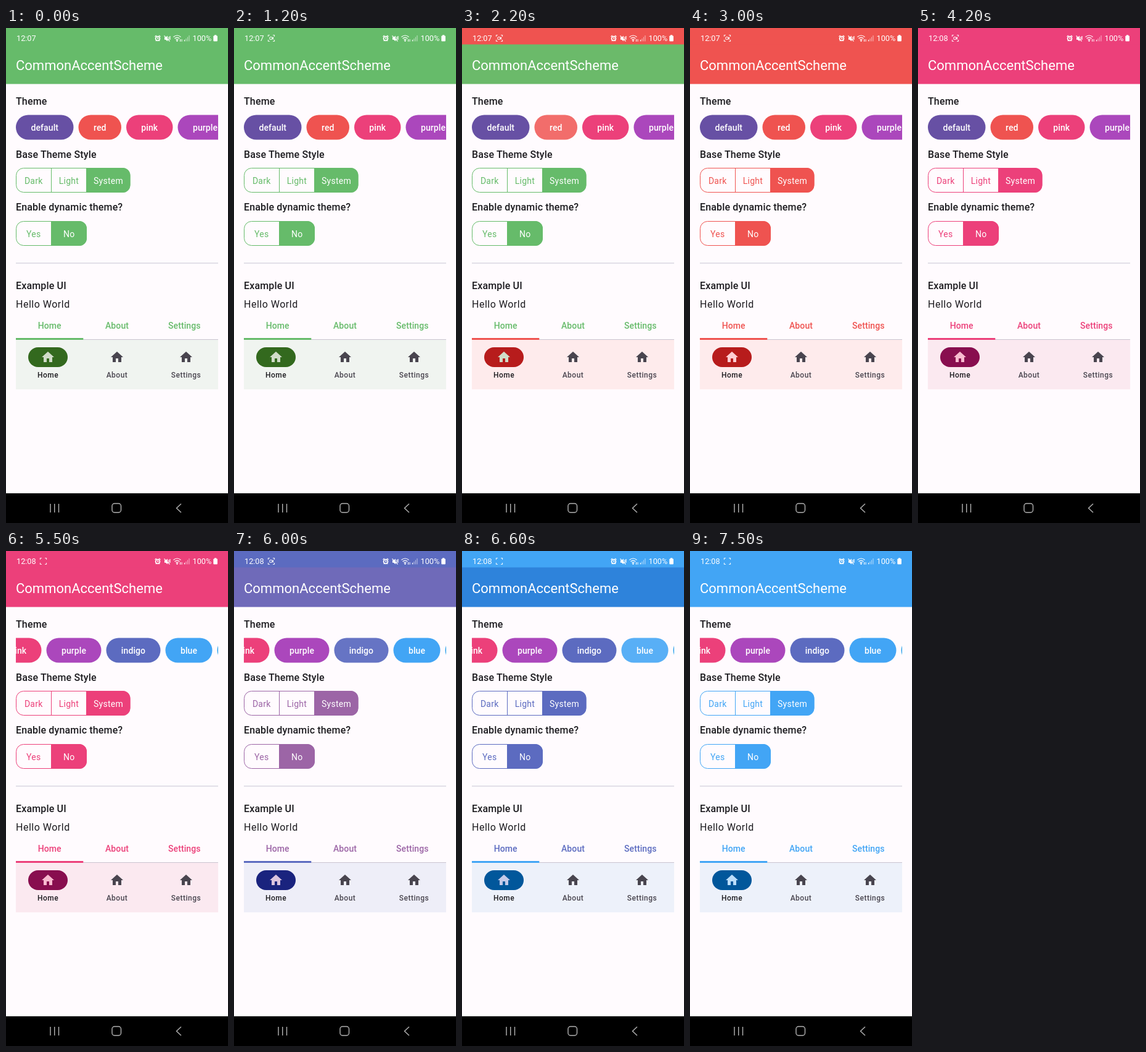
An HTML page that plays this animation: 360 px wide and 800 px high, repeating every 8 s.

```html
<!DOCTYPE html>
<html lang="en">
<head>
<meta charset="utf-8">
<title>Theme switcher</title>
<style>
html, body { margin: 0; width: 100%; height: 100%; overflow: hidden; background: #fffbfe; }
svg { display: block; }
text { font-family: Roboto, sans-serif; white-space: pre; }
.mid { text-anchor: middle; }
.title { font-size: 22px; fill: #fff; }
.head { font-size: 16px; font-weight: 500; letter-spacing: .15px; fill: #1c1b1f; }
.body { font-size: 16px; letter-spacing: .5px; fill: #1c1b1f; }
.label { font-size: 14px; font-weight: 500; letter-spacing: .1px; }
.option { font-size: 14px; letter-spacing: .25px; }
.nav { font-size: 12px; font-weight: 500; letter-spacing: .5px; }
.status { font-size: 12.7px; fill: #fff; }
.line { fill: none; stroke: #fff; stroke-width: 1.2; }
</style>
</head>
<body>
<svg id="stage" width="360" height="800" viewBox="0 0 360 800"></svg>
<script>
const LOOP = 8000, STEP = 100, SCROLL = 213;

// main: accent, pill: selected item, nav: bottom bar, icon: selected icon
const themes = [
  { flip: -9999, main: '#66bb6a', pill: '#33691e', nav: '#f0f4f0', icon: '#d0dcc8' },
  { press: 2000, flip: 2190, chip: 1, main: '#ef5350', pill: '#b71c1c', nav: '#feebec', icon: '#ffcdd2' },
  { press: 3400, flip: 3590, chip: 2, main: '#ec407a', pill: '#880e4f', nav: '#fbe9f0', icon: '#f8bbd0' },
  { press: 5700, flip: 5810, chip: 4, main: '#5c6bc0', pill: '#1a237e', nav: '#eeeef8', icon: '#c5cae9' },
  { press: 6400, flip: 6510, chip: 5, main: '#42a5f5', pill: '#01579b', nav: '#edf1fa', icon: '#bbdefb', via: '#2c80d9' }
];

const chips = [
  ['default', 16, 93.5, '#6750a4'], ['red', 117.5, 69.5, '#ef5350'],
  ['pink', 195, 75.5, '#ec407a'], ['purple', 278.5, 89, '#ab47bc'],
  ['indigo', 375.5, 88, '#5c6bc0'], ['blue', 471.5, 76, '#42a5f5'],
  ['cyan', 555.5, 78, '#29a0ea']
];

const text = (s, x, y, cls, fill = '') =>
  `<text x="${x}" y="${y}" class="${cls}"${fill && ` style="fill:${fill}"`}>${s}</text>`;
const rect = (x, y, w, h, fill, r = 0, extra = '') =>
  `<rect x="${x}" y="${y}" width="${w}" height="${h}" rx="${r}" style="fill:${fill}" ${extra}/>`;

const chip = ([name, x, w, fill]) =>
  rect(x, 140.5, w, 40, fill, 20) +
  rect(x, 140.5, w, 40, '#fff', 20, 'class="ripple" opacity="0"') +
  text(name, x + w / 2, 166, 'label mid', '#fff');

// A segmented control whose last option is selected
function segments(y, names, edges) {
  const [from, to] = edges.slice(-2);
  const dividers = edges.slice(1, -1).map(x => `M${x} ${y}v40`).join('');
  return `<g style="stroke:var(--seg);fill:none">
    <rect x="16.5" y="${y + .5}" width="${to - 17}" height="39" rx="12"/><path d="${dividers}"/></g>
    <path d="M${from} ${y}H${to - 12}a12 12 0 0 1 12 12v16a12 12 0 0 1-12 12H${from}z" style="fill:var(--seg)"/>` +
    names.map((name, i) => text(name, (edges[i] + edges[i + 1]) / 2, y + 26, 'option mid',
      i < names.length - 1 ? 'var(--seg)' : '#fff')).join('');
}

const tab = (name, i) => text(name, 16 + 328 / 3 * (i + .5), 485.5, 'label mid', 'var(--seg)');

function navItem(name, i) {
  const x = 68 + 112 * i;
  return (i ? '' : rect(36, 516, 64, 32, 'var(--pill)', 16)) +
    `<path transform="translate(${x - 12} 520)" d="M10 20v-6h4v6h5v-8h3L12 3 2 12h3v8z"
      style="fill:${i ? '#49454f' : 'var(--icon)'}"/>` +
    text(name, x, 565, 'nav mid', i ? '#49454f' : '#1c1b1f');
}

const statusIcons = `
  <g id="record" class="line">
    <path d="M55.5 14v-2.5h2.5M63 11.5h2.5V14M65.5 19v2.5H63M58 21.5h-2.5V19"/>
    <g id="dot"><rect x="58" y="14.5" width="3.6" height="4" rx="1"/><path d="M62 16l1.5-1v3L62 17"/></g>
  </g>
  <g class="line">
    <circle cx="246" cy="17" r="3.4" stroke-width="1.8"/>
    <path d="M241.5 14l2.4-2M250.5 14l-2.4-2M246 15v2.3h1.5M242.8 21l1-1M249.2 21l-1-1"/>
    <path d="M257 15h2l3-2.5v9L259 19h-2z" fill="#fff" stroke="none"/>
    <path d="M256.5 12.5l9 9M264 14v5M266 13v6"/>
    <path d="M271.5 14.5q6-5 12 0M273.5 17q4-3.4 8 0M275.5 19.2q2-1.8 4 0"/>
    <circle cx="277.5" cy="20.7" r=".6"/>
    <path d="M282.5 18v4M285 18v4" stroke-width="1"/>
    <path d="M289.5 19v2.5"/>
    <path d="M292 17v4.5M294.500 14.500v7M297 12v9.500" opacity=".5"/>
  </g>` +
  rect(336.3, 12.5, 6.6, 9, '#fff', 1) + rect(338, 11.3, 3.2, 2, '#fff');

const stage = document.getElementById('stage');
stage.innerHTML =
  '<clipPath id="row"><rect x="16" y="136" width="328" height="50"/></clipPath>' +
  rect(0, 0, 360, 800, '#fffbfe') +
  rect(0, 26, 360, 64.5, 'var(--bar)') + rect(0, 0, 360, 26.5, 'var(--main)') +
  '<text id="clock" class="status" x="17" y="21"></text>' + statusIcons +
  text('100%', 302.5, 21, 'status') +
  text('CommonAccentScheme', 16, 68, 'title') +
  text('Theme', 16, 124, 'head') +
  `<g clip-path="url(#row)"><g id="chips">${chips.map(chip).join('')}</g></g>` +
  text('Base Theme Style', 16, 209.5, 'head') +
  segments(226, ['Dark', 'Light', 'System'], [16, 73.5, 130.5, 201.5]) +
  text('Enable dynamic theme?', 16, 295, 'head') +
  segments(312, ['Yes', 'No'], [16, 73.5, 131]) +
  rect(16, 379.5, 328, 1, '#c6c5d4') +
  text('Example UI', 16, 421.5, 'head') +
  text('Hello World', 16, 451.5, 'body') +
  ['Home', 'About', 'Settings'].map(tab).join('') +
  rect(16, 503, 328, 1, '#cac4d0') + rect(16, 501, 109.3, 3, 'var(--main)') +
  rect(16, 504, 328, 80, 'var(--nav)') +
  ['Home', 'About', 'Settings'].map(navItem).join('') +
  rect(0, 748, 360, 4, '#fff') + rect(0, 752, 360, 48, '#000') +
  `<g fill="none" stroke="#b4b4b4" stroke-width="1.4">
    <path d="M72 769v14M78.700 769v14M85.500 769v14M284 769l-7.500 7 7.500 7"/>
    <rect x="172" y="768.500" width="14.500" height="14.500" rx="4"/></g>`;

const find = id => document.getElementById(id);
const clock = find('clock'), record = find('record'), dot = find('dot'), row = find('chips');
const ripples = [...document.querySelectorAll('.ripple')];
const clamp = v => Math.max(0, Math.min(1, v));
const mix = (a, b, p) => `color-mix(in oklab, ${b} ${(p * 100).toFixed(1)}%, ${a})`;
const spring = s => 1 - (1 + 20 * s) * Math.exp(-20 * s);
const setColor = (name, value) => stage.style.setProperty('--' + name, value);

function draw(t) {
  const index = themes.findLastIndex(theme => t >= theme.flip);
  const now = themes[index], before = themes[Math.max(0, index - 1)];
  const age = t - now.flip;
  const bar = age > 450 ? 1 : spring(age / 1000);
  const late = clamp((age - 100) / 150);

  for (const key of ['main', 'pill', 'nav']) setColor(key, now[key]);
  setColor('seg', mix(before.main, now.main, late));
  setColor('icon', mix(before.icon, now.icon, late));
  setColor('bar', !now.via ? mix(before.main, now.main, bar)
    : bar < .5 ? mix(before.main, now.via, bar * 2)
    : mix(now.via, now.main, bar * 2 - 1));

  ripples.forEach((ripple, i) => {
    const theme = themes.find(item => item.chip === i);
    const glow = theme ? Math.min(clamp((t - theme.press + 50) / 150), clamp((theme.flip + 300 - t) / 300)) : 0;
    ripple.setAttribute('opacity', .16 * glow);
  });

  const u = clamp((t - 4700) / 800) ** .75;
  row.setAttribute('transform', `translate(${-SCROLL * u * u * (3 - 2 * u)} 0)`);
  clock.textContent = t < 3700 ? '12:07' : '12:08';
  record.setAttribute('opacity', t < 100 ? 0 : .85);
  dot.setAttribute('opacity', t % 1000 < 500 ? 1 : 0);
}

const start = performance.now();
function tick() {
  const t = (performance.now() - start) % LOOP;
  draw(Math.floor(t / STEP) * STEP);
  requestAnimationFrame(tick);
}
tick();
</script>
</body>
</html>
```
